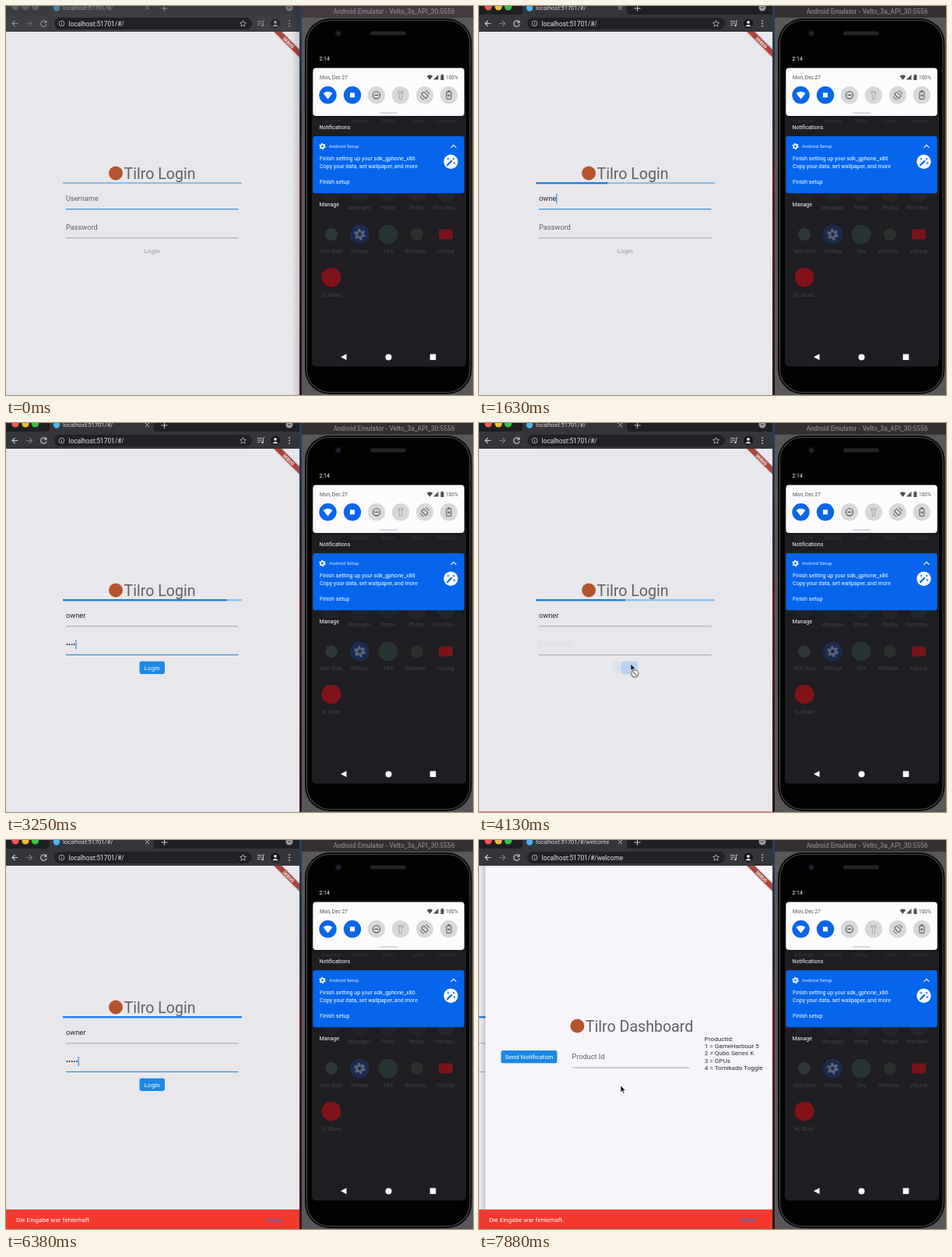
Write an HTML page that moves like this. It is 600 px wide and 499 px high and loops after 8 s.

```html
<!DOCTYPE html>
<html lang="en">
<head>
<meta charset="utf-8">
<title>Login demo</title>
<style>
  html, body { margin: 0; width: 100%; height: 100%; overflow: hidden; background: #000; }
  svg { display: block; width: 100vw; height: 100vh; }
  text { font-family: Roboto, Inter, sans-serif; white-space: pre; }
</style>
</head>
<body>
<svg id="stage" viewBox="0 0 600 499"></svg>
<script>
const LOOP = 8000, PAGE_W = 377;
const BLUE = '#1e88e5', INK = '#5f5f64', BRAND = '#b4542f';

// Markup helpers
const text = (x, y, size, str, fill, extra = '') =>
  `<text x="${x}" y="${y}" font-size="${size}" fill="${fill}" ${extra}>${str}</text>`;
const rect = (x, y, w, h, fill, extra = '') =>
  `<rect x="${x}" y="${y}" width="${w}" height="${h}" fill="${fill}" ${extra}/>`;
const circle = (x, y, r, fill, extra = '') =>
  `<circle cx="${x}" cy="${y}" r="${r}" fill="${fill}" ${extra}/>`;
const line = (d, stroke, width = 1, extra = '') =>
  `<path d="${d}" fill="none" stroke="${stroke}" stroke-width="${width}" ${extra}/>`;
const shape = (d, fill, extra = '') => `<path d="${d}" fill="${fill}" ${extra}/>`;
const gear = (x, y, r, fill, hole) =>
  circle(x, y, r * .75, fill) +
  circle(x, y, r * .85, 'none', `stroke="${fill}" stroke-width="${r * .4}" stroke-dasharray="${r * .45} ${r * .44}"`) +
  circle(x, y, r * .35, hole);
const middle = 'text-anchor="middle"';

function browserChrome() {
  const icon = '#c9cacd';
  const icons =
    circle(65, 2.5, 4.2, '#49b6f2') +
    text(73, 5.3, 7.5, '', '#dcdde0', 'id="tabTitle"') +
    line('M179 0l5 5M184 0l-5 5', icon, .9) +
    line('M203.5 -1v8M199.5 3h8', icon, 1) +
    circle(364, 2, 4.5, '#9b9ca0') + line('M362 1l2 2 2-2', '#202124', .9) +
    line('M15.5 22.5H8M11.5 19l-3.5 3.5 3.5 3.5', icon, 1.1) +
    line('M26 22.5h7.5M30 19l3.5 3.5-3.5 3.5', '#7d7e82', 1.1) +
    line('M51.2 20.2A3.7 3.7 0 1 0 52 23.4', icon, 1.1) + shape('M52.4 18v3.8h-3.8Z', icon);
  return rect(0, 0, PAGE_W, 33, '#202124', 'id="strip"') +
    [12, 25, 37.5].map((x, i) => circle(x, 1, 4.6, '#555', `id="light${i}"`)).join('') +
    shape('M52 11.5Q56 11 56 7V0H190V7Q190 11 194 11.5Z', '#35363a', 'class="bar"') +
    rect(0, 11, PAGE_W, 22, '#35363a', 'class="bar"') +
    `<g id="tools">${icons}</g>` +
    rect(62, 15, 254, 15, '#202124', 'rx="7.5"') +
    circle(71.5, 22.5, 3.4, 'none', `stroke="${icon}" stroke-width=".8"`) +
    line('M71.5 22v2.3M71.5 20.4v.9', icon, .8) +
    text(80.5, 25.6, 8.3, '', '#e6e7ea', 'id="url"') +
    line('M304.5 18.6l1.2 2.6 2.8.3-2.1 1.9.6 2.8-2.5-1.5-2.5 1.5.6-2.8-2.1-1.9 2.8-.3Z', icon, .8) +
    `<g id="menu">` +
    line('M323 19.5h6M323 22h6M323 24.5h3.5M330.5 25v-6h1.8', icon, .9) + circle(329.4, 25, 1.3, icon) +
    circle(346, 22.5, 6, '#17181a') + circle(346, 20.8, 1.9, '#eee') + shape('M342.3 26.2q3.7-4.6 7.4 0Z', '#eee') +
    [19, 22.5, 26].map(y => circle(364, y, .9, icon)).join('') + '</g>';
}

function loginPage() {
  return rect(0, 33, PAGE_W, 466, '#e8e7eb') +
    circle(141, 214.5, 9, BRAND) +
    text(151.5, 221.7, 19.6, 'Tilro Login', INK) +
    rect(73, 226, 230, 2.3, '#86c1f4') + rect(73, 226, 0, 2.3, '#1c7fe4', 'id="progress"') +
    text(77, 250, 9.23, 'Username', INK, 'id="userHint"') +
    text(77, 250, 9.23, '', '#222', 'id="userText"') +
    rect(77, 260.5, 221.5, .7, '#88888c', 'id="userLine"') +
    text(77, 287, 9.23, 'Password', INK, 'id="passHint"') +
    text(77, 287, 9.23, '', '#222', 'id="passText"') +
    rect(77, 297.3, 221.5, .7, '#88888c', 'id="passLine"') +
    rect(77, 241, 1.1, 12, BLUE, 'id="caret"') +
    rect(171.5, 305.7, 32.5, 16.2, BLUE, 'rx="2.3" id="button"') +
    circle(196, 314, 14, '#8fc3f4', 'id="splash" clip-path="url(#buttonClip)"') +
    text(187.7, 316.8, 8.08, 'Login', '#98989c', `${middle} id="loginLabel"`);
}

function dashboardPage() {
  const products = ['ProductId:', '1 = GameHarbour 5', '2 = Qubo Series K', '3 = GPUs', '4 = Tomikado Toggle'];
  return rect(-6, 33, 6, 466, 'url(#edge)') +
    rect(0, 33, PAGE_W, 466, '#f7f5f9') +
    circle(118, 238.5, 9, BRAND) +
    text(128.5, 245.8, 19.6, 'Tilro Dashboard', INK) +
    rect(20, 270, 72, 16.2, BLUE, 'rx="2.3"') +
    text(56, 281, 8.08, 'Send Notification', '#fff', middle) +
    text(111, 281, 9.23, 'Product Id', INK) +
    rect(111, 291.7, 151, .7, '#88888c') +
    products.map((p, i) => text(281.5, 257.7 + i * 9.3, 8.08, p, '#29292c')).join('');
}

function debugBanner() {
  return shape('M342.8 33H355.5L377 54.5V67.2Z', '#000', 'opacity=".12"') +
    shape('M344.4 33H354L377 56V65.6Z', '#a8463e') +
    text(0, 21.9, 5.6, 'DEBUG', '#f6e6e4', `${middle} font-weight="900" transform="translate(377 33) rotate(45)"`);
}

function snackbar() {
  return rect(0, 474, PAGE_W, 26, '#f4392f') +
    text(13, 490, 8.08, 'Die Eingabe war fehlerhaft.', '#fff') +
    text(335, 490, 8.08, 'Close', '#3f74d6', 'font-weight="500"');
}

function appGrid() {
  const cols = [418, 454.5, 491, 528, 565], dim = '#454549';
  const labels = (names, y, fill) =>
    names.map((n, i) => n && text(cols[i], y, 6.3, n, fill, middle)).join('');
  const icons = ['#222327', '#1f252d', '#1f252d', '#272427', '#222729'];
  return labels(['Calendar', 'Camera', 'Surfer', 'Clock', 'Contacts'], 150, '#35353a') +
    icons.map((c, i) => circle(cols[i], 239, 12, c)).join('') +
    labels(['', 'Messages', 'Phone', 'Photos', 'Film Movi...'], 261, dim) +
    circle(418, 293, 8, '#2d3838') +
    circle(454.5, 293, 12.5, '#1b2b4e') + gear(454.5, 293, 7, '#59647a', '#1b2b4e') +
    circle(491, 293, 12.5, '#263433') +
    circle(528, 293, 8, '#2b302d') +
    rect(556, 286.5, 18, 13, '#78141a', 'rx="3"') +
    labels(['Item Store', 'Settings', 'Tilro', 'WebView...', 'VidLoop'], 317, dim) +
    circle(418, 348, 12.5, '#80131a') +
    text(418, 373, 6.3, 'VL Music', dim, middle);
}

function quickSettings() {
  const ink = '#4d4d50', tiles = [413.5, 445, 476, 507, 538, 569];
  const wifi = (x, y, r, fill) => shape(`M${x} ${y + r}L${x - r * 1.2} ${y - r * .5}Q${x} ${y - r * 1.4} ${x + r * 1.2} ${y - r * .5}Z`, fill);
  return rect(394.3, 79.6, 194.5, 61.4, '#fdfbfe', 'rx="4"') +
    text(403, 93.6, 6.5, 'Mon, Dec 27', ink) +
    wifi(544.5, 91.5, 3.2, ink) + shape('M549 94.5h6.5V88Z', ink) +
    rect(558.5, 88.5, 4, 6.5, ink, 'rx=".6"') + rect(559.6, 87.6, 1.8, 1.2, ink) +
    text(565, 93.6, 6.5, '100%', ink) +
    tiles.map((x, i) => circle(x, 114.3, 11.2, i < 2 ? '#0766ea' : '#d8d7da')).join('') +
    wifi(413.5, 114.5, 5, '#fff') +
    rect(442, 111.3, 6, 6, '#fff') +
    circle(476, 114.3, 4.6, 'none', `stroke="${ink}" stroke-width="1.1"`) + line('M473.5 114.3h5', ink, 1.2) +
    line('M504 109.5h6v2.2l-1.4 2v6h-3.2v-6l-1.4-2ZM504 111.7h6', '#a9a8ac', 1) +
    `<g transform="rotate(-45 538 114.3)">${rect(535.8, 110.4, 4.4, 7.8, 'none', `stroke="${ink}" rx=".7"`)}</g>` +
    line('M539 108.5q4 1 4.6 4.6M537 120q-4-1-4.6-4.6', ink, .9) +
    rect(566, 110, 6, 9.4, 'none', `stroke="${ink}" rx=".8"`) + rect(567.5, 108.5, 3, 1.5, ink) +
    line('M567.3 114.8h3.4M569 113.1v3.4', ink, .9) +
    rect(480, 136.5, 23, 1.2, '#c6c5c9', 'rx=".6"');
}

function phone() {
  return rect(380, 0, 220, 14.5, '#332f33', 'id="emulator"') +
    text(498.5, 10, 8.4, 'Android Emulator - Velto_3a_API_30:5556', '#858186', `${middle} font-weight="500"`) +
    rect(380, 14.5, 220, 485, '#59575a') +
    rect(384, 16, 214.5, 482, '#0b0b0c', 'rx="32"') +
    rect(386.5, 18.5, 209.5, 477, '#020203', 'rx="29.5" stroke="#444447" stroke-width="1.2"') +
    circle(427, 35, 4, '#16171d') + circle(427, 35, 1.8, '#29334c') +
    rect(468, 32.5, 46, 5, '#252527', 'rx="2.5"') +
    rect(393, 56, 198, 406.5, 'url(#screen)', 'rx="5"') +
    appGrid() +
    text(402.5, 70, 6.9, '2:14', '#fff') +
    quickSettings() +
    text(402.5, 157.8, 7, 'Notifications', '#fff') +
    rect(394.3, 167, 194.5, 73.3, '#0565ec', 'rx="3"') +
    gear(406.5, 180, 4, '#fff', '#0565ec') +
    text(415, 182.3, 6.1, 'Android Setup', '#e6efff') +
    line('M571.5 181.8l3.5-3.5 3.5 3.5', '#fff', 1.1) +
    text(403, 198, 7.15, 'Finish setting up your sdk_gphone_x86', '#fff') +
    text(403, 208, 7.15, 'Copy your data, set wallpaper, and more', '#fff') +
    text(403, 227.9, 7.15, 'Finish setup', '#fff') +
    circle(571.5, 199.7, 9.2, '#fff') +
    line('M566.5 204.7l6.5-6.5', '#0565ec', 2.2) +
    line('M574.5 196.7l1.3-1.3', '#0565ec', 2) +
    line('M568 194.5v3M566.5 196h3M576 200v3M574.5 201.5h3', '#0565ec', .8) +
    text(402.5, 257.3, 7.1, 'Manage', '#fff') +
    shape('M437.5 446.3v8l-7.5-4Z', '#fff') + circle(491.5, 450.4, 4, '#fff') + rect(544.7, 446.5, 7.6, 7.6, '#fff');
}

function pointers() {
  const arrow = 'M0 0V8.5L2 6.8 3.5 10 4.8 9.4 3.4 6.3H6Z';
  return `<g id="pointer">
    <g id="arrow">${shape(arrow, '#000', 'stroke="#fff" stroke-width=".6"')}</g>
    <g id="denied">${circle(5.2, 12.5, 4.6, '#eee', 'stroke="#77777b" stroke-width="1.2"')}${line('M2 9.3l6.4 6.4', '#77777b', 1.2)}</g>
    <g id="beam">${line('M-2-4.5Q0-4.5 0-3V3Q0 4.5-2 4.5M2-4.5Q0-4.5 0-3M0 3Q0 4.5 2 4.5M-1 .8h2', '#222', .9)}</g>
  </g>`;
}

const stage = document.getElementById('stage');
stage.innerHTML = `<defs>
    <clipPath id="pageClip">${rect(0, 33, PAGE_W, 466, '#fff')}</clipPath>
    <clipPath id="buttonClip">${rect(171.5, 305.7, 32.5, 16.2, '#fff', 'rx="2.3"')}</clipPath>
    <linearGradient id="screen" x2="0" y2="1"><stop offset=".06" stop-color="#020203"/><stop offset=".22" stop-color="#1e1d21"/></linearGradient>
    <linearGradient id="edge"><stop stop-color="#000" stop-opacity="0"/><stop offset="1" stop-color="#000" stop-opacity=".15"/></linearGradient>
    <linearGradient id="desk" x2="0" y2="1"><stop stop-color="#27415f"/><stop offset=".3" stop-color="#1b2838"/><stop offset=".45" stop-color="#541d29"/><stop offset="1" stop-color="#2a1219"/></linearGradient>
  </defs>` +
  rect(377, 0, 3, 499, 'url(#desk)') + phone() + browserChrome() +
  `<g clip-path="url(#pageClip)">
    <g id="login">${loginPage()}</g><g id="dashboard">${dashboardPage()}</g>
    ${debugBanner()}<g id="snack">${snackbar()}</g>${pointers()}
  </g>` + rect(367, 0, 10, 499, 'url(#edge)', 'id="windowShadow"');

const el = {};
stage.querySelectorAll('[id]').forEach(n => el[n.id] = n);
const bars = stage.querySelectorAll('.bar');
const set = (id, attrs) => { for (const k in attrs) el[id].setAttribute(k, attrs[k]); };
const write = (id, str) => { if (el[id].textContent !== str) el[id].textContent = str; };
const show = (id, on) => set(id, { opacity: +on });

// Timing helpers
const clamp = v => Math.max(0, Math.min(1, v));
const ramp = (t, start, length) => clamp((t - start) / length);
const bezier = (x1, y1, x2, y2) => x => {
  const at = (a, b, s) => 3 * (1 - s) ** 2 * s * a + 3 * (1 - s) * s * s * b + s ** 3;
  let lo = 0, hi = 1;
  for (let i = 0; i < 24; i++) {
    const s = (lo + hi) / 2;
    if (at(x1, x2, s) < x) lo = s; else hi = s;
  }
  return at(y1, y2, lo);
};
const slideEase = bezier(.35, .91, .33, .97), snackEase = bezier(.4, 0, .2, 1), moveEase = bezier(.4, 0, .3, 1);

const FOCUS = 350, USER_KEYS = 1150, PASS_FOCUS = 2100, PASS_KEYS = 2750, CLICK = 3960,
  RESET = 4030, SNACK = 4095, CLEARED = 4110, REFOCUS = 5250, RETRY_KEYS = 5450, ROUTE = 7525;
const KEY = 150;
const mousePath = [[130, 330, 300], [350, 232, 249], [3500, 232, 249], [3900, 195, 309], [4300, 195, 309],
  [4900, 180, 297], [6550, 180, 297], [6900, 182, 315], [8000, 182, 315]];

const typed = (t, start, count) => t < start ? 0 : Math.min(count, 1 + Math.floor((t - start) / KEY));

function mouseAt(t) {
  let i = 1;
  while (i < mousePath.length - 1 && t > mousePath[i][0]) i++;
  const [t0, x0, y0] = mousePath[i - 1], [t1, x1, y1] = mousePath[i];
  const p = moveEase(ramp(t, t0, t1 - t0));
  return [x0 + (x1 - x0) * p, y0 + (y1 - y0) * p];
}

function drawWindow(t) {
  const active = t >= FOCUS;
  const lights = active ? ['#f4574f', '#f5bd2f', '#2fc840'] : ['#5b5c60', '#5b5c60', '#5b5c60'];
  lights.forEach((fill, i) => set('light' + i, { fill }));
  set('strip', { fill: active ? '#1f2023' : '#3a3b3f' });
  bars.forEach(b => b.setAttribute('fill', active ? '#35363a' : '#3d3e42'));
  set('emulator', { fill: active ? '#332f33' : '#453a40' });
  set('tools', { opacity: active ? 1 : .6 });
  set('menu', { opacity: active ? 1 : .6 });
  show('windowShadow', !active);
  const url = 'localhost:51701/#/' + (t >= ROUTE ? 'welcome' : '');
  write('url', url);
  write('tabTitle', url);
}

function drawForm(t) {
  const users = typed(t, USER_KEYS, 5);
  const retry = t >= RESET;
  const keyStart = retry ? RETRY_KEYS : PASS_KEYS;
  const bullets = typed(t, keyStart, 5);
  write('userText', 'owner'.slice(0, users));
  write('passText', '•'.repeat(bullets));
  show('userHint', !users);
  set('passHint', { opacity: bullets ? 0 : retry ? ramp(t, CLEARED, 250) : 1 });

  const passFocused = (t >= PASS_FOCUS && t < CLICK) || (t >= REFOCUS && t < 6950);
  const userFocused = t < PASS_FOCUS;
  // A focused underline thickens upwards from a fixed bottom edge
  const underline = (bottom, on) => {
    const height = on ? 1.2 : .7;
    return { fill: on ? '#2b8fd6' : '#88888c', height, y: bottom - height };
  };
  set('userLine', underline(261.2, userFocused));
  set('passLine', underline(298, passFocused));

  const field = userFocused ? el.userText : el.passText;
  const keys = userFocused ? users : bullets;
  const lastKey = (userFocused ? USER_KEYS : keyStart) + (keys - 1) * KEY;
  const focusTime = userFocused ? FOCUS : retry ? REFOCUS : PASS_FOCUS;
  const phase = (t - (keys ? lastKey : focusTime)) % 1000;
  const blink = phase < 550 ? clamp((550 - phase) / 100) : ramp(phase, 900, 100);
  set('caret', {
    x: 77 + (keys ? field.getComputedTextLength() : 0),
    y: userFocused ? 241 : 278,
    opacity: t >= FOCUS && (userFocused || passFocused) ? blink : 0
  });

  const done = .5 * ramp(t, USER_KEYS, 600) + .5 * ramp(t, keyStart, 600);
  set('progress', { width: 230 * done });

  const fading = retry && !bullets;
  set('button', { opacity: bullets ? 1 : fading ? 1 - ramp(t, RESET, 106) : 0 });
  set('splash', { r: 4 + 10 * ramp(t, CLICK, 170), opacity: t < CLICK ? 0 : .6 * (1 - ramp(t, 4080, 250)) });
  set('loginLabel', { fill: bullets ? '#fff' : '#98989c', opacity: fading ? .15 + .85 * ramp(t, 4130, 200) : 1 });
}

function drawPages(t) {
  const slide = slideEase(ramp(t, ROUTE, 500));
  set('login', { transform: `translate(${t < ROUTE ? 0 : -PAGE_W / 3 * slide} 0)` });
  set('dashboard', { transform: `translate(${PAGE_W * (1 - slide)} 0)`, opacity: +(t >= ROUTE) });
  set('snack', { transform: `translate(0 ${26 * (1 - snackEase(ramp(t, SNACK, 250)))})` });
}

function drawPointer(t) {
  const [x, y] = mouseAt(t);
  const beam = t >= 4750 && t < 6700;
  set('pointer', { transform: `translate(${x} ${y})` });
  show('pointer', (t >= 130 && t < USER_KEYS) || (t >= 3500 && t < RETRY_KEYS) || t >= 6500);
  show('arrow', !beam);
  show('beam', beam);
  show('denied', t >= RESET && t < 4500);
}

const start = performance.now();
function frame() {
  const t = (performance.now() - start) % LOOP;
  drawWindow(t);
  drawForm(t);
  drawPages(t);
  drawPointer(t);
  requestAnimationFrame(frame);
}
frame();
</script>
</body>
</html>
```
